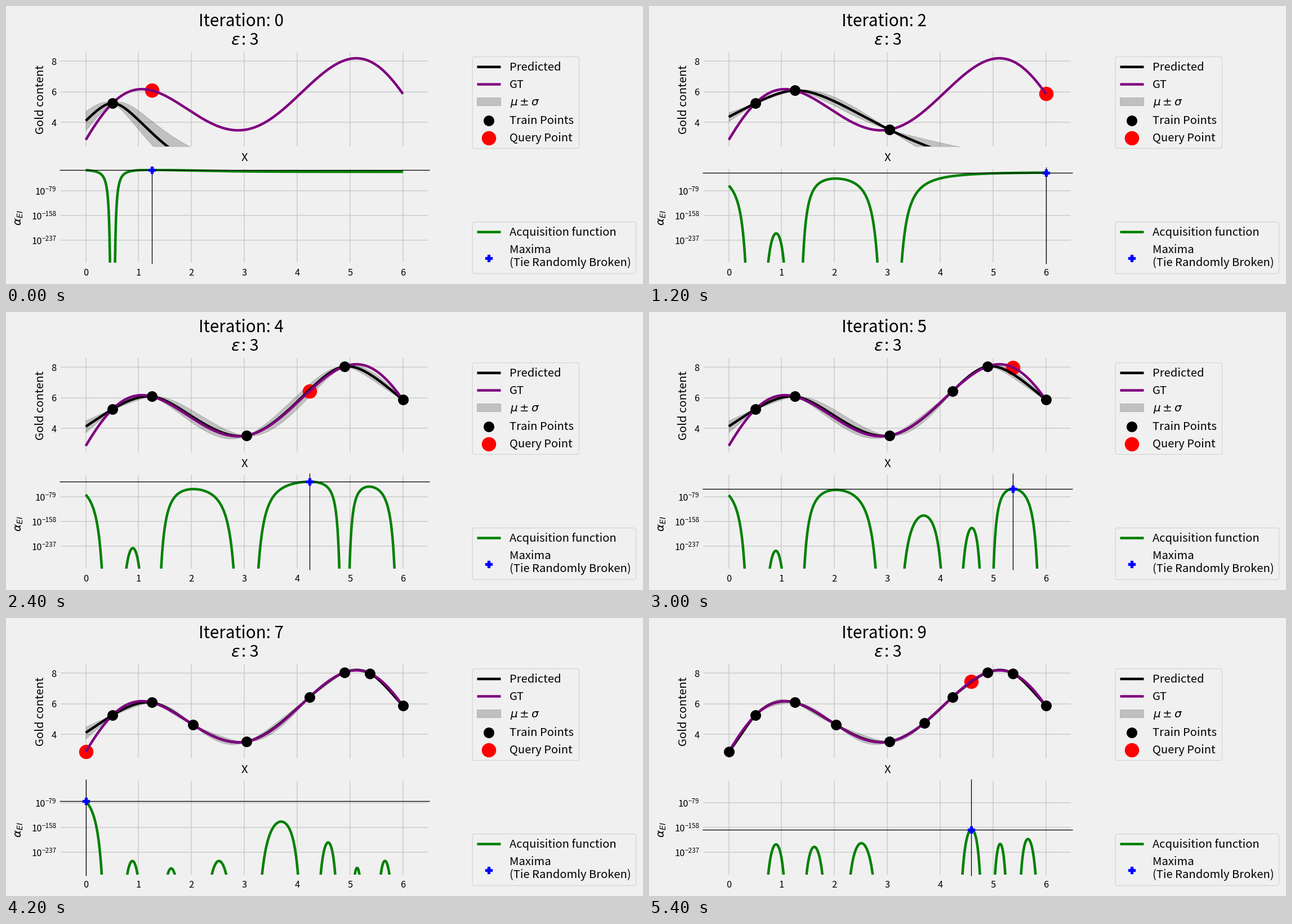
These frames come from a looping animation (1131x495 px, 6 s). A matplotlib script:

```python
import numpy as np
import matplotlib.pyplot as plt
from matplotlib.animation import FuncAnimation
from matplotlib.patches import FancyBboxPatch, Rectangle

W, H = 1131, 495
BG = "#f0f0f0"
SANS = "Noto Sans CJK JP"
MATH = "DejaVu Sans"
LINE = 4.5
EPS = 3

plt.rcParams["lines.solid_capstyle"] = "butt"
plt.rcParams["mathtext.fontset"] = "dejavusans"

# Known samples of the gold content along the field
KNOTS = np.array([0, .506, 1.07, 1.249, 2.03, 2.87, 3.037, 3.70, 4.231,
                  4.586, 4.893, 5.12, 5.377, 6])
VALUES = np.array([2.86, 5.26, 6.17, 6.09, 4.63, 3.487, 3.53, 4.752, 6.44,
                   7.468, 8.037, 8.207, 7.985, 5.865])
# First training point followed by the point queried at each iteration
VISITS = np.array([.506, 1.249, 3.037, 6, 4.893, 4.231, 5.377, 2.03, 0,
                   3.70, 4.586])
UNFITTED = {0, 8}  # iterations that keep the default length scale
xs = np.linspace(0, 6, 2401)


def gaussian(a, b, length=1.3):
    return np.exp(-.5 * ((a[:, None] - b) / length) ** 2)


def matern(a, b, length):
    s = np.sqrt(3) * np.abs(a[:, None] - b) / length
    return (1 + s) * np.exp(-s)


smooth = np.linalg.solve(gaussian(KNOTS, KNOTS) + 1e-5 * np.eye(len(KNOTS)),
                         VALUES - 5.5)


def truth(x):
    return 5.5 + gaussian(np.atleast_1d(x), KNOTS) @ smooth


def gram(x, length):
    return matern(x, x, length) + 1e-10 * np.eye(len(x))


def fit_length(x, y):
    """Length scale with the highest marginal likelihood."""
    def cost(length):
        k = gram(x, length)
        return y @ np.linalg.solve(k, y) + np.linalg.slogdet(k)[1]
    return min(np.geomspace(.5, 6, 400), key=cost)


def predict(step):
    x = VISITS[:step + 1]
    y = truth(x)
    length = 1.0 if step in UNFITTED else fit_length(x, y)
    k, ks = gram(x, length), matern(xs, x, length)
    mean = ks @ np.linalg.solve(k, y)
    var = 1 - np.sum(ks * np.linalg.solve(k, ks.T).T, axis=1)
    return x, y, mean, np.sqrt(np.maximum(var, 1e-9))


def log_improvement(mean, std, best):
    """log10 of expected improvement, by its far-tail expansion."""
    z = (mean - best - EPS) / std
    log_ei = np.log(std / np.sqrt(2 * np.pi) / (z * z + 3)) - z * z / 2
    return np.maximum(log_ei / np.log(10), -450)


# Stage layout, in pixels
X0, X_STEP = 141.6, 93.85


def x_at(px):
    return (px - X0) / X_STEP


def gold_at(py):
    return 8 - (py - 98.3) / 27.25


def power_at(py):
    return (285.75 - py) * 1.806


fig = plt.figure(figsize=(W / 72, H / 72), dpi=72, facecolor=BG)
page = fig.add_axes([0, 0, 1, 1])
page.set(xlim=(0, W), ylim=(H, 0))
page.axis("off")


def panel(top, bottom, to_data, ticks):
    left, right = 97, 749
    ax = fig.add_axes([left / W, 1 - bottom / H,
                       (right - left) / W, (bottom - top) / H])
    ax.set(xlim=(x_at(left), x_at(right)),
           ylim=(to_data(bottom), to_data(top)),
           xticks=range(7), yticks=ticks, facecolor="none")
    ax.tick_params(length=0, labelbottom=False, labelleft=False)
    ax.grid(color="#cbcbcb", lw=1.5)
    ax.set_axisbelow(True)
    for spine in ax.spines.values():
        spine.set_visible(False)
    return ax


def label(x, y, text, size=20.2, font=SANS, **kw):
    return page.text(x, y, text, fontsize=size, family=font,
                     va="baseline", **kw)


gold = panel(82.3, 249.6, gold_at, [4, 6, 8])
acq = panel(289.8, 457, power_at, [-237, -158, -79])

# Titles, axis names and tick labels
title = label(341.5, 36.5, "", 29.6)
label(400, 69, "ε", 29, MATH, style="italic")
label(417.5, 69, ": 3", 29)
upright = dict(rotation=90, rotation_mode="anchor", ha="center")
label(67, 166.5, "Gold content", 20.3, **upright)
label(28, 377, r"$\alpha_{EI}$", 20, MATH, **upright)
label(423, 276, "X", ha="center")
for n in range(7):
    label(X0 + X_STEP * n, 479.5, str(n), 16.5, ha="center")
for n in (4, 6, 8):
    label(89.5, 98.3 + (8 - n) * 27.25 + 6.3, str(n), 16.5, ha="right")
for n in (79, 158, 237):
    y = 285.75 + n / 1.806
    power = f"−{n}"
    label(89.5, y + .8, power, 11.7, ha="right")
    label(89.5 - 6.5 * len(power), y + 7, "10", 16.5, ha="right")


# Legends
def legend_box(x0, y0, x1, y1):
    page.add_patch(FancyBboxPatch(
        (x0, y0), x1 - x0, y1 - y0,
        boxstyle="round,pad=0,rounding_size=4",
        fc=BG, ec="#cccccc", lw=1.2, alpha=.8))


def legend_line(y, color):
    page.plot([836, 878], [y, y], color=color, lw=LINE)


DOT = dict(color="black", ms=19, mew=0)
TARGET = dict(color="red", ms=25.5, mew=0)
PLUS = dict(color="blue", ms=12, mew=1.3)

legend_box(828, 90.5, 1017.5, 253.5)
legend_line(108, "black")
legend_line(139, "purple")
page.add_patch(Rectangle((836, 162.5), 42, 14.5, color="black", alpha=.2,
                         lw=.8))
page.plot(857, 204, "o", **DOT)
page.plot(857, 235, "o", **TARGET)
for y, text in ((115, "Predicted"), (146, "GT"), (210, "Train Points"),
                (241, "Query Point")):
    label(894, y, text)
label(895, 177, r"$\mu \pm \sigma$", 20, MATH)

legend_box(828, 384.5, 1118.5, 476.5)
legend_line(402, "green")
page.plot(857, 448.5, "P", **PLUS)
for y, text in ((409, "Acquisition function"), (440, "Maxima"),
                (463.5, "(Tie Randomly Broken)")):
    label(894, y, text)

# Moving parts
query, = gold.plot([], [], "o", zorder=1.5, **TARGET)
predicted, = gold.plot([], [], color="black", lw=LINE, zorder=2)
gold.plot(xs, truth(xs), color="purple", lw=LINE, zorder=3)
trained, = gold.plot([], [], "o", zorder=10, clip_on=False, **DOT)
curve, = acq.plot([], [], color="green", lw=LINE, zorder=2)
level, = acq.plot([], [], color="black", lw=1.3, zorder=3, clip_on=False)
drop, = acq.plot([], [], color="black", lw=1.3, zorder=3, clip_on=False)
peak, = acq.plot([], [], "P", zorder=4, clip_on=False, **PLUS)
band = []


def draw(step):
    x, y, mean, std = predict(step)
    nxt = VISITS[step + 1]
    power = log_improvement(mean, std, y.max())
    top = np.interp(nxt, xs, power)

    title.set_text(f"Iteration: {step}")
    while band:
        band.pop().remove()
    band.append(gold.fill_between(xs, mean - std, mean + std, color="black",
                                  alpha=.2, lw=.8, zorder=1))
    predicted.set_data(xs, mean)
    trained.set_data(x, y)
    query.set_data([nxt], truth(nxt))
    curve.set_data(xs, power)
    level.set_data([-.5, 6.5], [top, top])
    drop.set_data([nxt, nxt], [power_at(459), power_at(287)])
    peak.set_data([nxt], [top])
    return []


anim = FuncAnimation(fig, draw, frames=10, interval=600, repeat=True,
                     repeat_delay=0, init_func=lambda: [])
plt.show()
```
